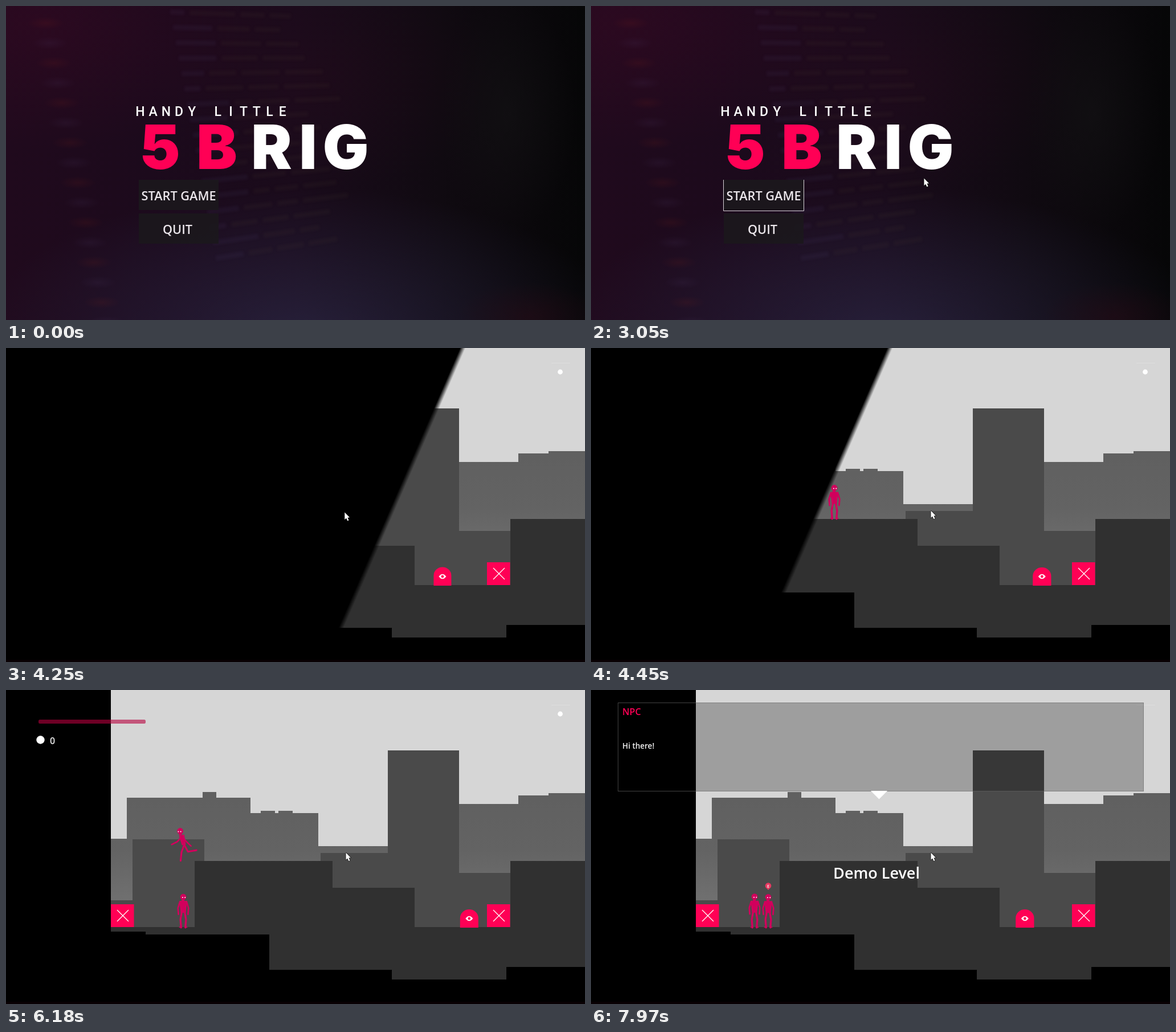
Recreate the animation shown at these times as an HTML page with a canvas. Size 1016 px wide and 551 px high, loop 8000 ms.

```html
<!DOCTYPE html>
<html lang="en">
<head>
<meta charset="utf-8">
<title>Game menu and level</title>
<style>
html, body { margin: 0; width: 100%; height: 100%; overflow: hidden; background: #000; }
canvas { display: block; width: 100vw; height: 100vh; }
</style>
</head>
<body>
<canvas id="stage" width="1016" height="551"></canvas>
<script>
const W = 1016, H = 551, LOOP = 8000;
const PINK = '#ff0055', BODY = '#d1005c';
const stage = document.getElementById('stage').getContext('2d');
let c = stage;

// Moments of the story, in ms.
const CURSOR_IN = 660, CLICK = 1400, LEVEL = 3980, RUN = 5690, LEDGE = 6150, TURN = 6420, TALK = 6660, DIALOG = 7440;

const clamp = v => Math.max(0, Math.min(1, v));
const progress = (t, from, to) => clamp((t - from) / (to - from));
const easeOut = k => 1 - (1 - k) ** 2;
// Bounces 0 → 1 → 0 once per period, at 0 when t is 0.
const triangle = (t, period) => 1 - Math.abs(1 - 2 * (((t / period) % 1 + 1) % 1));

function rect(x1, y1, x2, y2, color) {
  c.fillStyle = color;
  c.fillRect(x1, y1, x2 - x1, y2 - y1);
}

function disc(x, y, r, color) {
  c.fillStyle = color;
  c.beginPath();
  c.arc(x, y, r, 0, 7);
  c.fill();
}

function poly(points, color) {
  c.fillStyle = color;
  c.beginPath();
  points.forEach(([x, y]) => c.lineTo(x, y));
  c.closePath();
  c.fill();
}

function line(points, color, width) {
  c.strokeStyle = color;
  c.lineWidth = width;
  c.beginPath();
  points.forEach(([x, y]) => c.lineTo(x, y));
  c.stroke();
}

function text(str, x, y, font, color, align = 'left') {
  c.font = font;
  c.fillStyle = color;
  c.textAlign = align;
  c.fillText(str, x, y);
}

const label = (str, x, y, size, color, align) =>
  text(str, x, y, `600 ${size}px "Open Sans", "Noto Sans", sans-serif`, color, align);

function gradient(x1, y1, x2, y2, ...colors) {
  const g = c.createLinearGradient(x1, y1, x2, y2);
  colors.forEach((color, i) => g.addColorStop(i / (colors.length - 1), color));
  return g;
}

function glow(x, y, rx, ry, rgb, alpha) {
  c.save();
  c.translate(x, y);
  c.scale(rx, ry);
  const g = c.createRadialGradient(0, 0, 0, 0, 0, 1);
  g.addColorStop(0, `rgba(${rgb},${alpha})`);
  g.addColorStop(1, `rgba(${rgb},0)`);
  disc(0, 0, 1, g);
  c.restore();
}

// ---------- cursor ----------

// Each glide starts at a time, lasts a while and ends at a point; lift bends its path upwards.
const glides = [
  { at: CURSOR_IN, lasts: 600, x: 335, y: 328, lift: 0 },
  { at: 1520, lasts: 730, x: 564, y: 310, lift: 27 },
  { at: 2580, lasts: 470, x: 584, y: 302, lift: 0 },
  { at: LEVEL, lasts: 470, x: 596, y: 285, lift: 0 }
];

function cursorAt(t) {
  let x = 902, y = 541;
  for (const glide of glides) {
    const k = easeOut(progress(t, glide.at, glide.at + glide.lasts));
    x += (glide.x - x) * k;
    y += (glide.y - y) * k - glide.lift * Math.sin(Math.PI * k);
  }
  return [x, y];
}

function drawCursor(t) {
  if (t < CURSOR_IN) return;
  c.save();
  c.translate(...cursorAt(t));
  const arrow = [[.5, .5], [.5, 13], [3.3, 10.4], [5.4, 15.2], [7.6, 14.2], [5.5, 9.6], [9, 9.3]];
  c.lineJoin = 'round';
  line([...arrow, arrow[0]], '#111', 1.4);
  poly(arrow, '#fff');
  c.restore();
}

// ---------- menu ----------

function makeBackdrop() {
  const layer = document.createElement('canvas');
  layer.width = W;
  layer.height = H;
  c = layer.getContext('2d');
  rect(0, 0, W, H, gradient(0, 0, W, 0, '#200a1d', '#1c0a1c', '#1a0b1b', '#100a11', '#060607'));
  glow(60, 30, 420, 220, '66,8,38', .35);
  glow(560, 120, 300, 200, '46,10,30', .25);
  glow(520, 570, 560, 250, '46,44,76', .6);
  glow(880, 190, 120, 210, '24,24,25', .4);
  glow(920, 545, 130, 60, '56,8,20', .3);

  let seed = 7;
  const random = () => (seed = seed * 16807 % 2147483647) / 2147483647;
  for (let row = 0; row < 17; row++) {
    c.save();
    c.filter = 'blur(2px)';
    c.translate(288 + row * 5, 10 + row * 27);
    c.rotate(.035 - row * .012);
    for (let x = 0; x < 190;) {
      const w = 25 + random() * 60;
      rect(x, -4, x + w, 5, x ? 'rgba(100,88,62,.07)' : 'rgba(95,75,130,.09)');
      x += w + 9;
    }
    c.restore();
    glow(70 + row * 7, 30 + row * 35, 32, 11, row % 2 ? '90,70,120' : '150,40,25', .11);
  }
  c = stage;
  return layer;
}

const backdrop = makeBackdrop();

function button(name, textX, y, hover) {
  rect(233, y, 373, y + 53, hover ? 'rgba(56,53,57,.92)' : 'rgba(27,24,28,.9)');
  label(name, textX, y + 35.5, 21.7, '#ebe6eb', 'center');
}

function drawMenu(t) {
  c.drawImage(backdrop, 0, 0);
  [...'HANDY LITTLE'].forEach((letter, i) =>
    text(letter, 235.5 + i * 22.7, 193, '500 23px Roboto, sans-serif', '#fff', 'center'));
  const centers = [271, 370, 466, 530, 596];
  [...'5BRIG'].forEach((letter, i) =>
    text(letter, centers[i], 286, '900 107px Inter, sans-serif', i < 2 ? PINK : '#fff', 'center'));

  const [x, y] = cursorAt(t);
  button('START GAME', 303, 305, x > 233 && x < 373 && y > 305 && y < 358);
  button('QUIT', 301, 364, false);
  if (t >= CLICK) line([[232.5, 305], [232.5, 359.5], [373.5, 359.5], [373.5, 305]], '#d8d4d8', 1);
}

// ---------- level ----------

// Fills below a stepped outline; each step is [left edge, top].
function skyline(color, ...steps) {
  steps.forEach(([x, y], i) => rect(x, y, i + 1 < steps.length ? steps[i + 1][0] : W, H, color));
}

function drawScenery() {
  rect(0, 0, W, H, '#000');
  rect(184, 0, W, H, '#d6d6d6');
  const far = gradient(0, 190, 0, 370, '#606060', '#636363', '#707070');
  skyline(far, [184, 261], [212, 189], [429, 216], [548, 274], [795, 200], [899, 185], [952, 181]);
  rect(345, 179, 369, 190, far);
  for (const x of [447, 478]) rect(x, 212, x + 25, 217, far);
  skyline('#4a4a4a', [184, 369], [222, 262], [348, H], [552, 286], [670, 106], [795, 321]);
  skyline('#303030', [184, 416], [331, 300], [573, 347], [717, 416], [885, 300]);
  skyline('#000', [184, 424], [245, 429], [462, 491], [677, 508], [878, 486]);
  rect(0, 547, W, H, '#080003');
}

function crate(x) {
  rect(x, 376, x + 40.5, 416, PINK);
  line([[x + 11, 386], [x + 31, 406]], '#fff', 1.2);
  line([[x + 31, 386], [x + 11, 406]], '#fff', 1.2);
}

function enemy(t) {
  const x = 824 - 88 * triangle(t - 6093, 1385);
  const squash = Math.sin((t - 6180) / 280);
  const r = 16 + squash * .9, top = 385 + squash;
  c.fillStyle = PINK;
  c.beginPath();
  c.ellipse(x, top + 15, r, 15, 0, Math.PI, 0);
  c.lineTo(x + r, 417);
  c.lineTo(x - r, 417);
  c.fill();
  c.fillStyle = '#fff';
  c.beginPath();
  c.moveTo(x - 6.5, 401);
  c.quadraticCurveTo(x, 392.5, x + 6.5, 401);
  c.quadraticCurveTo(x, 409.5, x - 6.5, 401);
  c.fill();
  disc(x, 401, 2.4, PINK);
}

// Angles are measured from straight down, positive towards the facing side.
function limb(x, y, upper, a, lower, b, width) {
  const kx = x + Math.sin(a) * upper, ky = y + Math.cos(a) * upper;
  line([[x, y], [kx, ky], [kx + Math.sin(b) * lower, ky + Math.cos(b) * lower]], BODY, width);
}

function head(x, y) {
  disc(x, y, 5.4, BODY);
  rect(x - 3, y + 3, x + 2, y + 8, BODY);
  disc(x - 1, y + 1, 1, '#fff');
  disc(x + 3.2, y + 1, 1, '#fff');
}

function standingPose(t) {
  for (const side of [-1, 1]) {
    limb(side * 2.5, -28, 14, side * .17, 14, side * -.08, 3.4);
    line([[side * 4, -.8], [side * 6.5, -.8]], BODY, 1.8);
  }
  c.translate(0, Math.sin(t / 260) * .5);
  for (const side of [-1, 1]) limb(side * 6, -45, 11, side * .3, 11, side * -.08, 2.8);
  poly([[-7, -47], [7, -47], [4.5, -26], [-4.5, -26]], BODY);
  head(0, -54);
}

function runningPose(phase) {
  for (const swing of [Math.sin(phase), -Math.sin(phase)]) {
    const kneeBend = Math.max(0, -swing) * 1.45;
    limb(-2, -29, 14, .42 * swing - .08, 15, .2 * swing - .1 - kneeBend, 3.2);
    limb(2, -43, 12, .75 * swing, 11, .95 * swing + .15, 2.6);
  }
  poly([[-2, -47], [7, -44], [2, -28], [-5, -29]], BODY);
  head(5, -53);
}

function figure(x, feet, facing, pose, phase) {
  c.save();
  c.translate(x, feet);
  c.scale(facing, 1);
  c.lineCap = c.lineJoin = 'round';
  pose(phase);
  c.restore();
}

// Runs left off the ledge, turns in the air and lands beside the other figure.
function player(t) {
  const x = 427 - 173 * progress(t, RUN, TURN) + 33 * progress(t, TURN, TURN + 200);
  const airtime = Math.max(0, t - LEDGE) / 1000;
  const feet = 300 + Math.min(117, 480 * airtime ** 2);
  const facing = t > RUN && t < TURN ? -1 : 1;
  if (t > RUN && t < TURN + 200) figure(x, feet, facing, runningPose, Math.PI / 2 + (t - 6180) / 80);
  else figure(x, feet, facing, standingPose, t);
}

function talkMarker() {
  disc(311, 343.5, 5.3, '#e83a62');
  poly([[307.5, 347], [314.5, 347], [311, 351]], '#e83a62');
  label('E', 311, 346.5, 7, '#fff', 'center');
}

function drawHud(alpha) {
  c.globalAlpha = alpha;
  c.fillStyle = 'rgba(184,0,62,.6)';
  c.beginPath();
  c.roundRect(57, 52, 188, 7, 2.5);
  c.fill();
  disc(60.5, 87.5, 7.2, '#fff');
  label('0', 77, 94.5, 16, '#e8e8e8');
  disc(972.5, 42, 4.4, '#fff');
  c.globalAlpha = 1;
}

function drawDialog(t) {
  c.globalAlpha = progress(t, DIALOG, DIALOG + 200);
  rect(47, 22, 970, 178, 'rgba(0,0,0,.262)');
  c.strokeStyle = 'rgba(110,110,110,.6)';
  c.lineWidth = 1;
  c.strokeRect(47.5, 22.5, 922, 155);
  poly([[491, 177], [520, 177], [505.5, 191.5]], '#fff');
  label('NPC', 55, 43.5, 16, PINK);
  const message = 'Hi there!';
  const typed = Math.floor(message.length * progress(t, DIALOG + 120, DIALOG + 460));
  label(message.slice(0, typed), 55, 103, 13.5, '#f2f2f2');
  c.globalAlpha = progress(t, DIALOG, DIALOG + 360);
  label('Demo Level', 501, 331, 27, '#fff', 'center');
  c.globalAlpha = 1;
}

// A slanted, soft-edged black cover that slides off to the left.
function drawWipe(t) {
  const slope = .435, soft = 4;
  const edge = 1177 - (t - LEVEL) * 1.385;
  rect(0, 0, W, 547, gradient(edge - soft, -soft * slope, edge + soft, soft * slope, '#000', 'rgba(0,0,0,0)'));
}

function drawLevel(t) {
  drawScenery();
  crate(184);
  crate(844);
  enemy(t);
  figure(311, 417, 1, standingPose, t + 400);
  player(t);
  if (t >= TALK) talkMarker();
  rect(957, 26, 990, 27, '#dedede');
  drawHud(1 - progress(t, DIALOG, DIALOG + 200));
  if (t >= DIALOG) drawDialog(t);
  drawWipe(t);
}

const start = performance.now();
function frame() {
  const t = (performance.now() - start) % LOOP;
  if (t < LEVEL) drawMenu(t);
  else drawLevel(t);
  drawCursor(t);
  requestAnimationFrame(frame);
}
frame();
</script>
</body>
</html>
```
